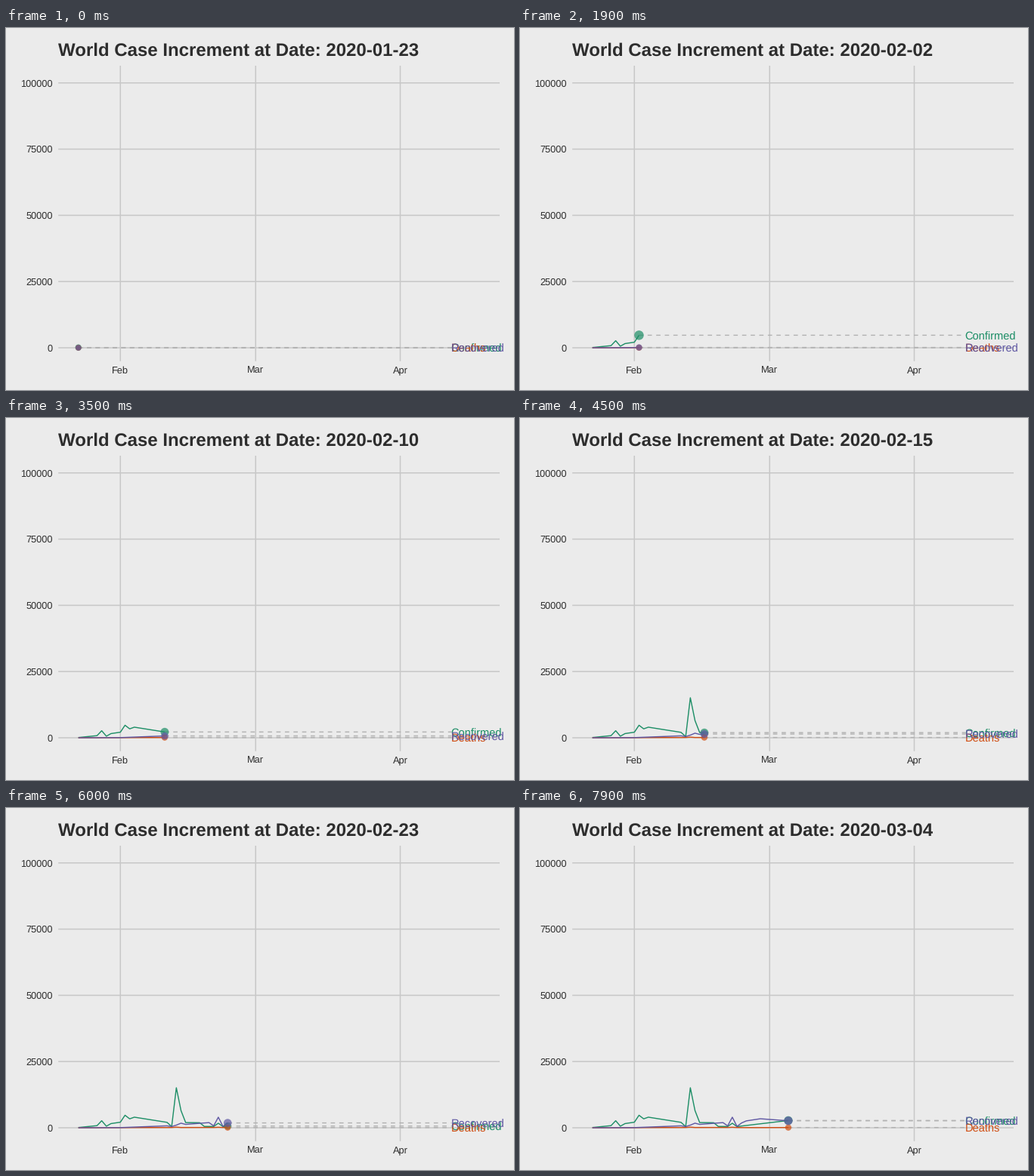
Recreate the animation shown at these times as a matplotlib script. Size 672 px wide and 480 px high, loop 8 s.

```python
import matplotlib.pyplot as plt
import numpy as np
from matplotlib.animation import FuncAnimation
from matplotlib.patches import Circle

W, H, DPI = 672, 480, 96
PT = 72 / DPI  # points per pixel
BG, GRID, DASH, INK = "#ebebeb", "#c8c8c8", "#b2b2b2", "#2d2d2d"
FRAMES, STEP = 80, 149 / 79  # frames per day
START = np.datetime64("2020-01-23")
LABEL_DAY = 80
Y_MAX = 101400

DAYS = np.arange(43)
KEYS = np.round(DAYS * STEP)  # frame on which each day is reached

plt.rcParams.update({"font.family": "Liberation Sans", "text.hinting": "none"})


def daily(trend, jumps):
    """Straight-line trend through key points, plus single-day jumps."""
    values = np.interp(DAYS, *zip(*trend.items()))
    for day, jump in jumps.items():
        values[day] += jump
    return values


SERIES = {
    "Confirmed": ("#1d8e66", daily(
        {0: 100, 4: 800, 9: 2100, 12: 4000, 19: 2050, 26: 1900, 27: 500,
         31: 450, 42: 2750},
        {5: 1600, 6: -730, 10: 2000, 20: -1600, 21: 13100, 22: 4500, 30: 1250})),
    "Deaths": ("#d04e13", daily(
        {0: 2, 20: 100, 28: 115, 35: 60, 42: 95}, {21: 150, 30: 100})),
    "Recovered": ("#5f57a3", daily(
        {0: 0, 9: 60, 19: 730, 28: 1950, 32: 1830, 33: 2600, 36: 3400, 42: 2640},
        {20: -400, 22: 600, 29: -1200, 30: 2100, 31: -1350})),
}


def px(day):
    return 95.74 + 6.171 * day


def py(value):
    return 424 - 0.003512 * np.asarray(value)


def radius(value):
    return 3.8 + 11.4 * np.sqrt(value / Y_MAX)


fig = plt.figure(figsize=(W / DPI, H / DPI), dpi=DPI, facecolor=BG)
ax = fig.add_axes([0, 0, 1, 1])
ax.set(xlim=(0, W), ylim=(H, 0))
ax.axis("off")


def line(xs, ys, color, width, z, **kw):
    return ax.plot(xs, ys, color=color, lw=width * PT, zorder=z, snap=False,
                   solid_capstyle="butt", solid_joinstyle="round", **kw)[0]


def text(x, y, s, size, color=INK, **kw):
    return ax.text(x, y, s, size=size * PT, color=color, va="baseline", **kw)


for v in range(0, 100001, 25000):
    line([69.2, 653], [py(v)] * 2, GRID, 1.55, 1)
    text(62, py(v) + 4.7, str(v), 12.8, ha="right")
for day, name in ((9, "Feb"), (38, "Mar"), (69, "Apr")):
    line([px(day)] * 2, [50, 441.8], GRID, 1.55, 1)
    text(px(day), 458.2, name, 12.8, ha="center")
title = text(69.2, 36.6, "", 24, weight="bold")

parts = []
for k, (name, (color, values)) in enumerate(SERIES.items()):
    path = line([], [], color, 1.42, 2 + k / 10)
    dash = line([], [], DASH, 1.42, 3, linestyle=(0, (4, 4)), dash_capstyle="butt")
    dot = ax.add_patch(Circle((0, 0), 4, fc=color, ec="none", alpha=0.7,
                              zorder=4 + k / 10))
    label = text(px(LABEL_DAY) - 0.8, 0, name, 14.67, color, zorder=5 + k / 10)
    parts.append((values, path, dash, dot, label))


def draw(i):
    title.set_text(f"World Case Increment at Date: {START + int(i / STEP)}")
    now = np.interp(i, KEYS, DAYS)
    past = DAYS[DAYS < now]
    for values, path, dash, dot, label in parts:
        value = np.interp(now, DAYS, values)
        x, y = px(now), py(value)
        path.set_data(px(np.append(past, now)),
                      py(np.append(values[:len(past)], value)))
        dash.set_data([x, px(LABEL_DAY)], [y, y])
        dot.set_center((x, y))
        dot.set_radius(radius(value))
        label.set_y(y + 6.2)
    return []


anim = FuncAnimation(fig, draw, frames=FRAMES, interval=100, repeat=True,
                     repeat_delay=0, blit=False)
plt.show()
```
